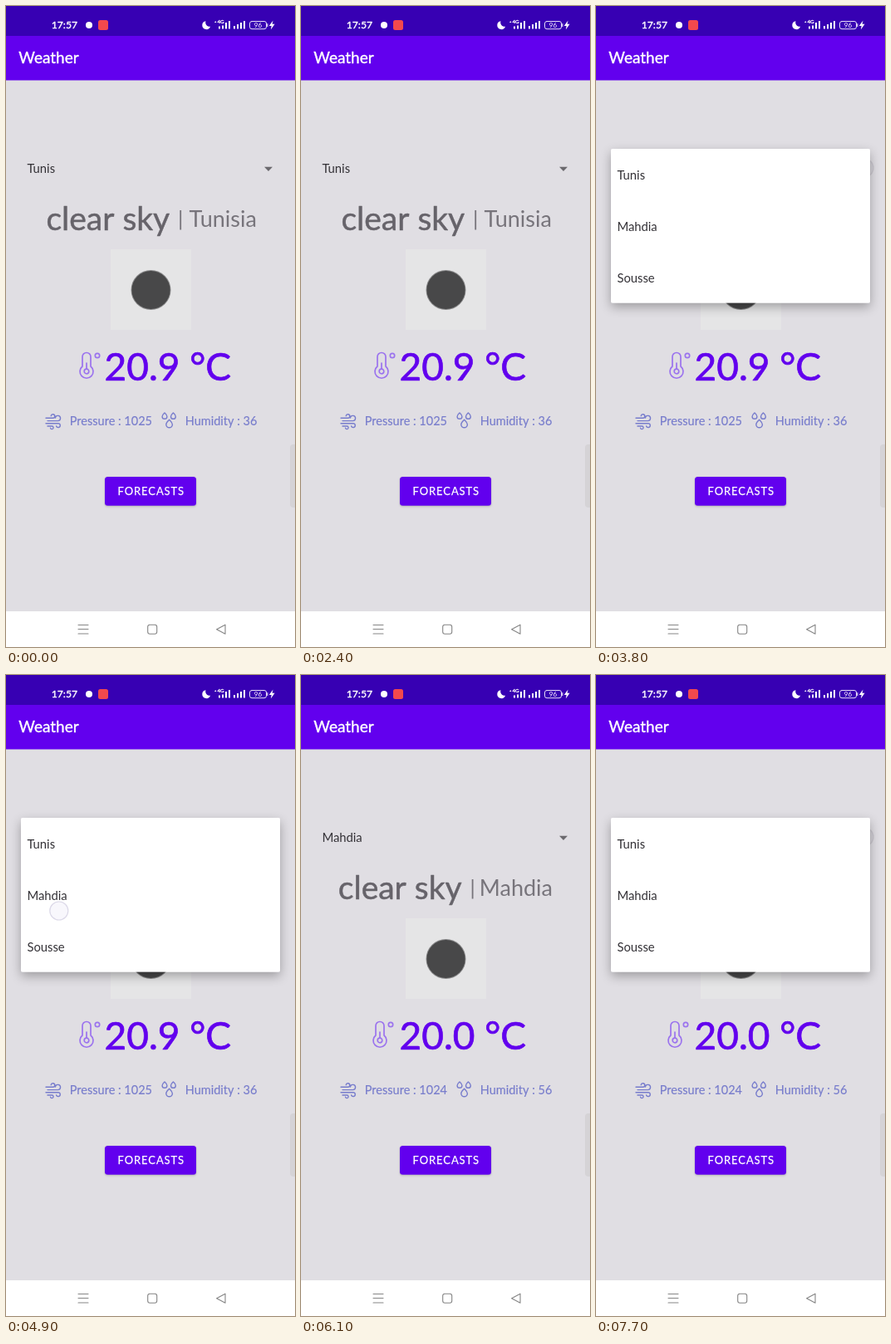
These frames come from a looping animation (348x772 px, 8 s). An HTML page with a canvas:

```html
<!DOCTYPE html>
<html lang="en">
<head>
<meta charset="utf-8">
<title>Weather</title>
<style>
html, body { margin: 0; width: 100%; height: 100%; overflow: hidden; background: #e0dee3; }
canvas { display: block; width: 348px; height: 772px; }
</style>
</head>
<body>
<canvas id="stage"></canvas>
<script>
const W = 348, H = 772, LOOP = 8000, STEP = 100;
const FONT = 'Lato, "Noto Sans", sans-serif';
const PURPLE = '#6200ee', BLUE = '#777ccc', BG = '#e0dee3';
const canvas = document.getElementById('stage');
const ctx = canvas.getContext('2d');
const dpr = window.devicePixelRatio || 1;
canvas.width = W * dpr;
canvas.height = H * dpr;

const tunis = { place: 'Tunisia', temp: '20.9 °C', pressure: 1025, humidity: 36, skyX: 122.8, bar: 209.3, placeX: 220.6, thermo: 97 };
const mahdia = { place: 'Mahdia', temp: '20.0 °C', pressure: 1024, humidity: 56, skyX: 119.2, bar: 205.7, placeX: 214.8, thermo: 95 };

// Popup and touch keyframes: [time, value]
const popupKeys = [[0, 0], [3600, 0], [3800, 1], [5000, 1], [5200, 0], [7400, 0], [7600, 1], [LOOP, 1]];
const itemTouchKeys = [[0, 0], [4700, 0], [4800, 1], [4900, 1], [5100, 0], [LOOP, 0]];

function sample(keys, t) {
  for (let i = 1; i < keys.length; i++) {
    const [t0, a] = keys[i - 1], [t1, b] = keys[i];
    if (t <= t1) return a + (b - a) * (t - t0) / (t1 - t0);
  }
  return keys[keys.length - 1][1];
}

// Weight is an extra outline in pixels that thickens the regular face
function text(str, x, y, size, color, { weight = 0, gap = 0, align = 'left' } = {}) {
  ctx.font = `${size}px ${FONT}`;
  ctx.letterSpacing = gap + 'px';
  ctx.textAlign = align;
  ctx.fillStyle = color;
  ctx.fillText(str, x, y);
  if (weight) {
    ctx.strokeStyle = color;
    ctx.lineWidth = weight;
    ctx.strokeText(str, x, y);
  }
}

function rect(x, y, w, h, color) {
  ctx.fillStyle = color;
  ctx.fillRect(x, y, w, h);
}

function round(x, y, w, h, r, color) {
  ctx.beginPath();
  ctx.roundRect(x, y, w, h, r);
  ctx.fillStyle = color;
  ctx.fill();
}

function disc(x, y, r, color) {
  ctx.beginPath();
  ctx.arc(x, y, r, 0, Math.PI * 2);
  ctx.fillStyle = color;
  ctx.fill();
}

function ring(x, y, r, color, width) {
  ctx.beginPath();
  ctx.arc(x, y, r, 0, Math.PI * 2);
  ctx.strokeStyle = color;
  ctx.lineWidth = width;
  ctx.stroke();
}

function line(path, color, width) {
  ctx.strokeStyle = color;
  ctx.lineWidth = width;
  ctx.stroke(new Path2D(path));
}

function shape(path, color) {
  ctx.fillStyle = color;
  ctx.fill(new Path2D(path));
}

function shadow(color, blur, dy) {
  ctx.shadowColor = color;
  ctx.shadowBlur = blur * dpr;
  ctx.shadowOffsetY = dy * dpr;
}

function bars(x, skip) {
  for (let i = 0; i < 4; i++) {
    const h = skip && i < 2 ? 3 + i : 3.5 + i * 2;
    rect(x + i * 4, 27.5 - h, 2, h, '#fff');
  }
}

function statusBar() {
  rect(0, 0, W, 36, '#3700b3');
  text('17:57', 54.7, 27.4, 12.2, '#fff', { weight: 0.4 });
  disc(100, 23, 4, '#fff');
  round(111, 17, 12, 12, 2.5, '#f2494d');
  shape('M240.5 18.2A5 5 0 1 0 246 24.8A5 5 0 0 1 240.5 18.2Z', '#fff');
  shape('M251 20l1.2-2 1.2 2Z', '#fff');
  text('4G', 254.4, 21.2, 6.3, '#fff', { weight: 0.3 });
  bars(256, true);
  bars(274, false);
  ctx.beginPath();
  ctx.roundRect(293.5, 18.5, 20, 9.2, 2.5);
  ctx.strokeStyle = '#e6def8';
  ctx.lineWidth = 1;
  ctx.stroke();
  rect(314.2, 21.2, 1.2, 3.8, '#e6def8');
  text('96', 303.5, 26.1, 8, '#fff', { align: 'center' });
  shape('M321.5 17.5L316.8 24H319.7L318.8 28.5L323.6 21.8H320.6Z', '#fff');
}

function titleBar() {
  rect(0, 36, W, 53.5, PURPLE);
  text('Weather', 15.3, 69.4, 19, '#fff', { weight: 0.4 });
}

function navBar() {
  const grey = '#858585';
  rect(0, 729, W, H - 729, '#fff');
  line('M87 745.5H99M87 750.5H99M87 756H99', grey, 1.1);
  ctx.beginPath();
  ctx.roundRect(170.7, 745.2, 11, 11, 2.5);
  ctx.stroke();
  line('M253.6 750.7L264 745.2V756.2Z', grey, 1.1);
}

function thermometer(x) {
  const color = '#9b73ee';
  ctx.save();
  ctx.translate(x, 0);
  line('M-5 434V422.5A5 5 0 0 1 5 422.5V434A8 8 0 1 1 -5 434Z', color, 1.7);
  line('M0 430V437', color, 1.7);
  ring(0, 440, 2.8, color, 1.7);
  ring(13, 421, 2.7, color, 1.7);
  ctx.restore();
}

function wind() {
  line('M48 496.3H56.5A2.3 2.3 0 1 0 54.2 493.7' +
    'M50 499.6H62.6A3.1 3.1 0 1 0 59.4 496' +
    'M48 502.8H62.8A2.4 2.4 0 1 1 60.6 506' +
    'M50 506H55.2A1.8 1.8 0 1 1 53.5 508.2', BLUE, 1.4);
}

function drop(x, y, r) {
  line(`M${x} ${y - r * 1.5}C${x + r * 0.5} ${y - r} ${x + r} ${y - r * 0.6} ${x + r} ${y}` +
    `A${r} ${r} 0 0 1 ${x - r} ${y}C${x - r} ${y - r * 0.6} ${x - r * 0.5} ${y - r} ${x} ${y - r * 1.5}Z`, BLUE, 1.4);
}

function picture() {
  rect(126, 293, 97, 97, '#e5e5e6');
  disc(174.5, 342, 24, '#8a8a8b');
  disc(174.5, 342, 23.1, '#484849');
}

function button() {
  shadow('rgba(0,0,0,.22)', 2.5, 1);
  round(119, 567, 110, 34.8, 3.5, PURPLE);
  shadow('transparent', 0, 0);
  text('FORECASTS', 174.8, 589.2, 13, '#fff', { weight: 0.25, gap: 0.9, align: 'center' });
}

function page(t) {
  const now = t < 5500 ? tunis : mahdia;
  text(t < 5100 ? 'Tunis' : 'Mahdia', 25.4, 201.4, 14.8, '#333136');
  shape('M311 193.8H321L316 198.9Z', '#6b696e');
  text('clear sky', now.skyX, 270.2, 39, '#66636a', { weight: 0.5, align: 'center' });
  rect(now.bar, 246, 1.8, 23.5, '#77747b');
  text(now.place, now.placeX, 266.4, 27, '#77747b');
  picture();
  thermometer(now.thermo);
  text(now.temp, 194.8, 451.3, 46, PURPLE, { weight: 0.7, align: 'center' });
  wind();
  drop(191, 494.4, 2.9);
  drop(201.4, 494.4, 2.9);
  drop(196.6, 504, 3.8);
  text('Pressure : ' + now.pressure, 76.8, 505.1, 14.5, BLUE, { weight: 0.15 });
  text('Humidity : ' + now.humidity, 215.8, 505.1, 14.5, BLUE, { weight: 0.15 });
  button();
  round(342, 528, 12, 76, 4, '#d5d3d6');
}

// The shadow is clipped to the outside so that the fading sheet stays clean
function popup(alpha) {
  if (alpha <= 0) return;
  const box = [18, 172, 312, 185.5];
  ctx.save();
  ctx.globalAlpha = alpha;
  ctx.save();
  ctx.beginPath();
  ctx.rect(0, 0, W, H);
  ctx.rect(...box);
  ctx.clip('evenodd');
  shadow('rgba(0,0,0,.3)', 13, 5);
  round(...box, 2, '#fff');
  ctx.restore();
  round(...box, 2, '#fff');
  ['Tunis', 'Mahdia', 'Sousse'].forEach((city, i) =>
    text(city, 25.4, 209.2 + i * 61.8, 14.8, '#333136'));
  ctx.restore();
}

function touch(x, y, alpha, fill, edge) {
  ctx.save();
  ctx.globalAlpha = alpha;
  disc(x, y, 11.5, fill);
  ring(x, y, 11, edge, 1.2);
  ctx.restore();
}

function draw(t) {
  ctx.setTransform(dpr, 0, 0, dpr, 0, 0);
  ctx.lineCap = ctx.lineJoin = 'round';
  rect(0, 0, W, H, BG);
  titleBar();
  statusBar();
  page(t);
  navBar();
  if ((t >= 3700 && t < 4300) || t >= 7500) {
    touch(323, 195, 0.8, '#d2cfd6', '#c8c5cd');
  }
  popup(sample(popupKeys, t));
  touch(63.8, 284, sample(itemTouchKeys, t), 'rgba(247,246,251,.85)', '#dcd9e8');
}

const start = performance.now();
function tick() {
  const t = (performance.now() - start) % LOOP;
  draw(Math.floor(t / STEP) * STEP);
  requestAnimationFrame(tick);
}
tick();
</script>
</body>
</html>
```
